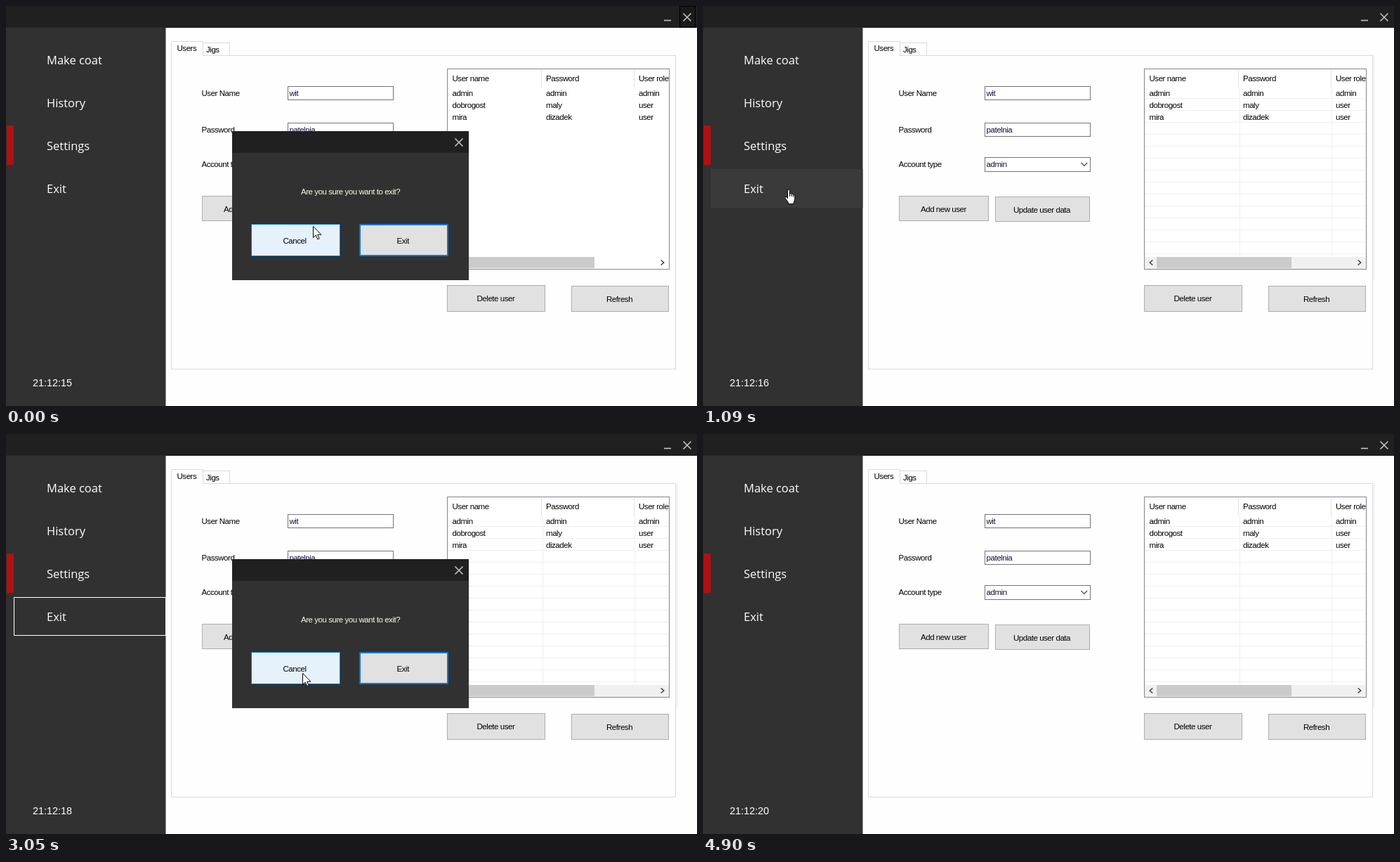
Animation, 984 px wide and 569 px high, one loop 5580 ms. Source, as an HTML page:

```html
<!DOCTYPE html>
<html lang="en">
<head>
<meta charset="utf-8">
<title>User settings</title>
<style>
html, body { margin: 0; width: 100%; height: 100%; overflow: hidden; background: #fefefe; }
svg { display: block; width: 100vw; height: 100vh; }
text { font: 11.5px "Liberation Sans", Arial, sans-serif; letter-spacing: -.45px; white-space: pre; }
.nav { font: 16.5px "Open Sans", sans-serif; letter-spacing: 0; fill: #fff; }
#clock { font-size: 14.4px; letter-spacing: 0; fill: #fff; }
.line { fill: none; stroke: #c4c4c4; stroke-width: 1.6; }
.chev { fill: none; stroke: #444; stroke-width: 1.6; }
.cursor { fill: #fff; stroke: #000; stroke-linejoin: round; }
</style>
</head>
<body>
<svg id="stage" viewBox="0 0 984 569"></svg>
<script>
const LOOP = 5580;

const box = (x, y, w, h, fill, stroke, more = '') => stroke
  ? `<rect x="${x + .5}" y="${y + .5}" width="${w - 1}" height="${h - 1}" fill="${fill}" stroke="${stroke}" ${more}/>`
  : `<rect x="${x}" y="${y}" width="${w}" height="${h}" fill="${fill}" ${more}/>`;
const text = (x, y, s, more = '') => `<text x="${x}" y="${y}" ${more}>${s}</text>`;
const path = (d, more) => `<path d="${d}" ${more}/>`;
const group = (id, ...parts) => `<g id="${id}">${parts.join('')}</g>`;
const button = (x, y, w, h, tx, ty, s) => box(x, y, w, h, '#e1e1e1', '#adadad') + text(tx, ty, s);
const cross = (x, y) => path(`M${x} ${y}l11 11m0-11l-11 11`, 'class="line"');
const field = (y, h, s) => box(401, y, 151, h, '#fff', '#737373') + text(403.5, y + 14, s, 'fill="#10103a"');

const rows = [
  [107, 'User name', 'Password', 'User role'],
  [128, 'admin', 'admin', 'admin'],
  [145, 'dobrogost', 'maly', 'user'],
  [162, 'mira', 'dizadek', 'user']
];
const cells = rows.map(([y, ...cols]) =>
  cols.map((s, i) => text([635.5, 769, 901][i], y, s)).join('')).join('');

let grid = 'M764.5 116V356M895.5 116V356';
for (let y = 131.5; y < 356; y += 17) grid += `M629 ${y}H944`;

const sidebar = [
  box(0, 0, 984, 31, '#202020'),
  box(0, 30.5, 227.5, 538.5, '#313131'),
  group('winClose', box(959, 0, 23, 31, '#1a1a1a', '#000')),
  path('M937 20.5h10', 'class="line"'), cross(964.5, 10.5),
  box(1, 170, 10, 56, '#b01113'),
  group('hover', box(11, 232, 216.5, 55, '#3a3a3a')),
  group('focus', box(11, 232, 217, 55, 'none', '#fff')),
  ...['Make coat', 'History', 'Settings', 'Exit'].map((s, i) => text(58, 83 + 61 * i, s, 'class="nav"')),
  text(38, 541.3, '', 'id="clock"')
];

const form = [
  box(235, 70, 719, 447, '#fefefe', '#dadada'),
  box(280, 52, 39, 19, '#fefefe', '#dadada'),
  path('M235.5 71V50.5H280.5V71', 'fill="#fefefe" stroke="#dadada"'),
  text(243.5, 64, 'Users'), text(285, 66, 'Jigs'),
  text(278.5, 128, 'User Name'), text(278.5, 180, 'Password'), text(278.5, 229, 'Account type'),
  field(114, 20, 'wit'), field(166, 20, 'patelnia'), field(215, 21, 'admin'),
  path('M538.5 223l4.3 4.3l4.3-4.3', 'class="chev" style="stroke-width:1.2"'),
  button(279, 270, 128, 36, 310, 292.5, 'Add new user'),
  button(416, 271, 135, 36, 442, 293.5, 'Update user data'),
  button(628, 397, 140, 38, 670.5, 420, 'Delete user'),
  button(805, 398, 139, 37, 855, 421, 'Refresh')
];

const table = [
  box(628, 89, 317, 286, '#fff', '#828790'),
  path('M762.5 91V116M894.5 91V116', 'stroke="#e2e2e2"'),
  group('grid',
    path(grid, 'stroke="#efefef"'),
    path('M955.5 70V390', 'stroke="#e6e6e6"'),
    box(629, 357, 315, 17, '#f0f0f0')),
  box(646, 357, 192, 16, '#cbcbcb'),
  path('M640.3 361.5l-4 3.5l4 3.5M932.7 361.5l4 3.5l-4 3.5', 'class="chev"'),
  cells
];

const dialog = group('dialog',
  box(322, 178, 337, 212, '#313131'),
  box(322, 178, 337, 31, '#202020'),
  cross(639.5, 188.5),
  text(420, 267.5, 'Are you sure you want to exit?', 'fill="#fffde0"'),
  box(349, 310, 127, 46, '#e1e1e1', '#adadad', 'id="cancel"'),
  text(394.5, 337.5, 'Cancel'),
  box(503, 310, 127, 46, '#e1e1e1', '#adadad'),
  box(503.5, 310.5, 126, 45, 'none', '#0078d7', 'id="exitFocus" stroke-width="2"'),
  text(556.5, 337.5, 'Exit'));

const arrow = path('M.5.5V16.5L4.2 13L6.8 18.8L9.2 17.8L6.7 12.2H11.8Z', 'class="cursor" id="arrow"');
const hand = group('hand',
  path('M4.5 1.8Q6 .2 7.5 1.8V7Q9 6 10.2 7.6Q11.8 6.8 12.7 8.4Q14.6 8 14.8 10V15Q14.6 17.5 13 19.5V21.5H5.5V19.5L.8 13Q.3 11 2.4 11.4L4.5 13.5Z', 'class="cursor"'),
  path('M7.5 7v4M10.2 7.8v3.4M12.7 8.6v3', 'stroke="#000" fill="none"'));

const $ = id => document.getElementById(id);
$('stage').innerHTML = [...sidebar, ...form, ...table, dialog, group('pointer', arrow, hand)].join('');

// time, left, top, hand shape
const moves = [
  [0, 437, 313], [150, 422, 328], [280, 413, 336],
  [700, 330, 314], [820, 205, 291], [940, 122, 269, 1], [1090, 116, 260, 1],
  [1360, 124, 271], [1510, 178, 286], [1630, 268, 306], [1750, 352, 325], [1870, 405, 337], [1990, 422, 340],
  [4090, 330, 328], [4210, 232, 316], [4360, 189, 303], [4510, 157, 284, 1]
];
const ticks = [940, 1990, 3050, 3940, 4900];

function draw(t) {
  const within = (...spans) => spans.some(([a, b]) => t >= a && t < b);
  const show = (id, on) => { $(id).style.display = on ? '' : 'none'; };

  const [, x, y, isHand] = moves.filter(m => m[0] <= t).pop();
  $('pointer').setAttribute('transform', `translate(${x} ${y})`);
  show('pointer', t < 4660);
  show('arrow', !isHand);
  show('hand', isHand);

  const pressed = within([400, 550], [3640, 3790]);
  const over = within([0, 550], [1750, 3790]);
  const cancel = $('cancel');
  cancel.setAttribute('fill', pressed ? '#cce4f7' : over ? '#e5f1fb' : '#e1e1e1');
  cancel.setAttribute('stroke', pressed ? '#005499' : over ? '#0078d7' : '#adadad');
  show('exitFocus', !pressed);

  show('dialog', within([0, 550], [1360, 3790]));
  show('winClose', t < 550);
  show('grid', t >= 550);
  show('hover', within([940, 1360], [4510, 4660]));
  show('focus', within([1240, 3790]));
  $('clock').textContent = '21:12:' + (15 + ticks.filter(k => k <= t).length);
}

const start = performance.now();
function loop() {
  draw((performance.now() - start) % LOOP);
  requestAnimationFrame(loop);
}
loop();
</script>
</body>
</html>
```
